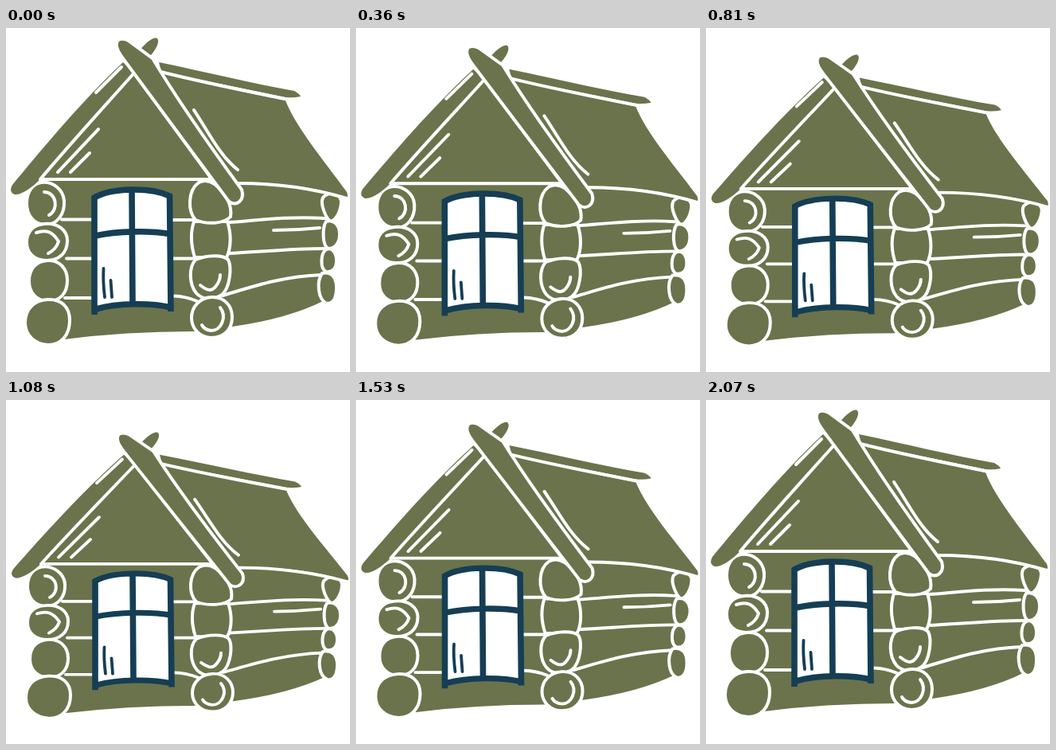
An HTML page that plays this animation: 432 by 432 pixels, repeating every 2.1 s.

```html
<!DOCTYPE html>
<html lang="en">
<head>
<meta charset="utf-8">
<title>Log cabin</title>
<style>
  html, body { margin: 0; width: 100%; height: 100%; overflow: hidden; background: #fff; }
  svg { display: block; width: 100vw; height: 100vh; }
  .wood { fill: #6b734c; }
  .log { fill: #6b734c; stroke: #fff; stroke-width: 4; }
  .line { fill: none; stroke: #fff; stroke-width: 4; stroke-linecap: round; stroke-linejoin: round; }
  .pane { fill: #fff; }
  .frame { fill: none; stroke: #153e54; stroke-width: 7.6; }
  .glint { fill: none; stroke: #153e54; stroke-width: 3.8; stroke-linecap: round; }
</style>
</head>
<body>
<svg viewBox="0 0 432 432">
  <g id="cabin">
    <!-- walls -->
    <path class="wood" d="M44 188H256L294 193Q350 194 402 207L400 342Q355 365 284 375L236 381Q150 381 73 391L50 370Z"/>
    <path class="line" d="M70 240.5H108M209 241H236M76 289.5H108M209 289.5H236M74 339H108M210 336.5Q226 337 240 343"/>
    <path class="line" d="M280 244C310 242 355 236 400 239M278 283C320 281 360 277 400 277M272 336C306 326 345 312 396 310"/>
    <path class="line" d="M336 254Q365 254 394 251"/>

    <!-- left log ends -->
    <path class="log" d="M44 194C59 192 72 203 73 217C74 234 64 247 50 247C34 247 26 234 26 220C26 206 33 196 44 194Z"/>
    <path class="log" d="M48 246C65 244 77 254 77 267C77 283 66 292 51 292C36 292 26 283 26 269C26 256 34 247 48 246Z"/>
    <path class="log" d="M52 292C67 291 77 302 77 317C77 333 68 343 53 343C39 343 29 333 29 318C29 303 37 293 52 292Z"/>
    <path class="log" d="M52 341C69 340 80 350 80 367C80 386 69 398 53 398C36 397 24 386 24 370C24 353 35 342 52 341Z"/>
    <path class="line" d="M48 206C63 206 67 228 54 235M38 257C50 253 58 255 66 268Q63 278 53 283"/>

    <!-- corner log ends -->
    <path class="log" d="M236 243C231 258 233 275 237 288H277C283 276 283 258 278 243Z"/>
    <path class="log" d="M242 194C228 204 228 230 238 241C252 247 274 246 282 237C284 224 278 210 262 196Q252 189 242 194Z"/>
    <path class="log" d="M238 291C252 285 272 284 279 291C284 301 281 327 271 335C261 342 247 342 239 333C230 322 229 301 238 291Z"/>
    <path class="log" d="M258 338C274 337 284 349 284 363C284 378 274 389 258 389C244 389 233 378 233 364C233 350 243 339 258 338Z"/>
    <path class="line" d="M244 323C253 330 258 331 263 325Q269 318 269 310M269 351C278 363 270 380 258 380Q249 379 246 373"/>

    <!-- far log ends -->
    <path class="log" d="M398 213C405 205 418 206 421 217C421 229 415 241 408 243C402 240 394 221 398 213Z"/>
    <path class="log" d="M402 243C411 240 419 247 419 259C419 270 413 277 405 277C397 274 397 251 402 243Z"/>
    <path class="log" d="M402 278C410 275 415 283 415 292C415 302 410 307 402 306C394 302 395 283 402 278Z"/>
    <path class="log" d="M397 308C408 306 415 312 415 326C415 340 411 346 403 346C391 341 390 318 397 308Z"/>

    <!-- roof -->
    <path class="wood" d="M192 43C250 55 310 70 362 79Q369 83 370 86Q361 88 351 87L195 55Z"/>
    <path class="wood" d="M185 53C240 67 300 80 351 91C364 125 402 170 428 206Q430 211 428 213C390 200 345 194 291 194Z"/>
    <path class="line" d="M192 54.5C250 69 305 80 355 90M292 195C340 195 388 202 428 214"/>
    <path class="line" d="M236 103C254 130 268 160 291 178"/>

    <!-- gable -->
    <path class="wood" d="M159 57L256 190H44Z"/>
    <path class="wood" d="M8 197C45 152 97 90 147 43L160 56L43 190C32 201 19 210 11 209Q3 206 8 197Z"/>
    <path class="line" d="M160 57.5C124 98 80 146 43 190H257"/>
    <path class="line" d="M113 81L145 49M65 181L116 127M81 181L105 157"/>
    <path class="wood" d="M166 30C174 20 183 12 189 12.5C195 16 187 30 178 38Z"/>
    <path class="log" d="M141 15Q147 12 154 16L184 38C206 75 250 140 296 203C300 216 290 225 280 218C236 159 189 95 146 37Q135 22 141 15Z"/>

    <!-- window -->
    <path class="pane" d="M111 212Q157 190 206 211L207 350Q160 339 112 354Z"/>
    <path class="frame" d="M111 360V213C131 201 181 199 205.5 211L207 356M113 353C140 345 183 345 207 351M158 203L159 347M112 261C139 255 181 254 207 259"/>
    <path class="glint" d="M122.5 302Q121.5 318 124 338M131.5 317L133 338"/>
  </g>
</svg>
<script>
  const LOOP = 2100, DOWN = 1080, UP = 990;
  const cabin = document.getElementById('cabin');

  function squash(t) {
    return t < DOWN ? t / DOWN : Math.max(0, 1 - (t - DOWN) / UP);
  }

  function draw(now) {
    const p = squash(now % LOOP);
    cabin.setAttribute('transform', `matrix(1 0 0 ${1 - 0.068 * p} ${p} ${28.8 * p})`);
  }

  const start = performance.now();
  function tick() {
    draw(performance.now() - start);
    requestAnimationFrame(tick);
  }
  tick();
</script>
</body>
</html>
```
